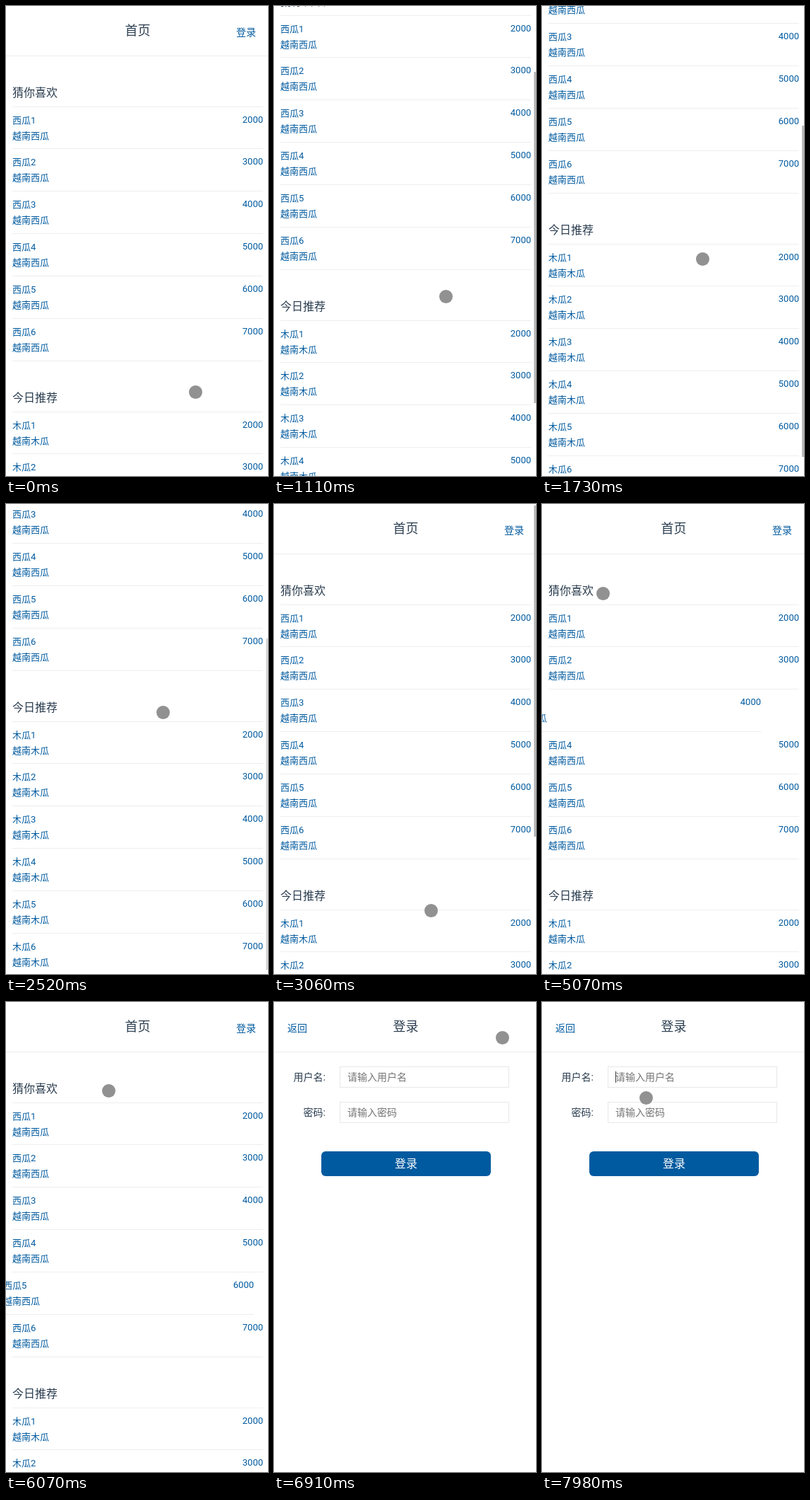
Recreate the animation shown at these times as an HTML page. Size 371x664 px, loop 8 s.

```html
<!DOCTYPE html>
<html lang="zh-CN">
<head>
<meta charset="utf-8">
<style>
html, body { margin: 0; width: 100%; height: 100%; overflow: hidden; background: #fff; }
body { position: relative; font-family: Roboto, "Noto Sans CJK SC", "Noto Sans CJK", sans-serif; }
div { position: absolute; box-sizing: border-box; }
.page { left: 0; top: 0; width: 371px; height: 934px; color: #2c3e50; }
.text { height: 20px; line-height: 20px; white-space: nowrap; }
.title { font-weight: 300; }
.link { color: #005a9f; }
.line { height: 1px; background: #eee; }
.field { left: 93px; width: 240px; height: 30px; border: 1px solid #e8e8e8; }
.hint { color: #757575; }
#button { left: 67px; top: 211px; width: 240px; height: 35px; border-radius: 6px; background: #005a9f; color: #fff; }
#caret { left: 104px; top: 98px; width: 1px; height: 16px; background: #333; }
#bar { left: 368px; top: 2px; width: 3px; height: 468px; background: #bbb; }
#dot { left: -9px; top: -9px; width: 19px; height: 19px; border-radius: 50%; background: #919191; }
</style>
</head>
<body>
<script>
const LOOP = 8000, LOGIN = 6830, MAX_SCROLL = 266, SWIPE = 700;

function box(parent, className, style = {}, id = '') {
  const el = document.createElement('div');
  el.className = className;
  el.id = id;
  for (const k in style) el.style[k] = style[k] + 'px';
  parent.append(el);
  return el;
}

// y is the middle of the text; align picks which end of it x names
function text(parent, str, x, y, size, className = '', align = 'left') {
  const shift = { left: 0, center: -50, right: -100 }[align];
  const el = box(parent, 'text ' + className, { left: x, top: y - 10, fontSize: size });
  if (shift) el.style.transform = `translateX(${shift}%)`;
  el.textContent = str;
}

const line = (parent, y, left = 9, width = 355) => box(parent, 'line', { left, top: y, width });

function header(page, title) {
  text(page, title, 186.5, 35, 18, 'title', 'center');
  line(page, 70, 0, 371);
}

function section(page, top, title, fruit) {
  text(page, title, 9, top + 123, 16);
  line(page, top + 142);
  return [1, 2, 3, 4, 5, 6].map(n => {
    const y = n === 1 ? 162 : 101 + n * 60;
    const row = box(page, '', { left: 0, top, width: 371, height: 0 });
    text(row, fruit + n, 9, y, 13, 'link');
    text(row, '越南' + fruit, 9, y + 22, 13, 'link');
    text(row, (n + 1) * 1000, 364, y - 1, 13, 'link', 'right');
    line(row, 141 + n * 60);
    return row;
  });
}

const home = box(document.body, 'page');
header(home, '首页');
text(home, '登录', 326, 37, 14, 'link');
const rows = section(home, 0, '猜你喜欢', '西瓜');
section(home, 431, '今日推荐', '木瓜');

const login = box(document.body, 'page');
header(login, '登录');
text(login, '返回', 19, 37, 14, 'link');
['用户名', '密码'].forEach((name, i) => {
  const y = 106 + i * 50;
  text(login, name + ':', 73, y, 14, '', 'right');
  box(login, 'field', { top: y - 15 });
  text(login, '请输入' + name, 104, y, 14, 'hint');
});
const button = box(login, '', {}, 'button');
text(button, '登录', 120, 17.5, 16, '', 'center');
const caret = box(login, '', {}, 'caret');

const bar = box(document.body, '', {}, 'bar');
const dot = box(document.body, '', {}, 'dot');

// 0 before a, 1 from b on, linear in between
const ramp = (t, a, b) => t >= b ? 1 : t <= a ? 0 : (t - a) / (b - a);

// flick down to the end of the list, then drag back to the top
const scrollAt = t => MAX_SCROLL * (1 - (1 - ramp(t, 560, 2060)) ** 1.45 - ramp(t, 2580, 3060));

// the bar dims while the list rests
const barAlpha = t =>
  ramp(t, 560, 640) - .45 * (ramp(t, 2200, 2520) - ramp(t, 2580, 2640)) - ramp(t, 3200, 3600);

// pull to the left, spring back slightly too far, settle
function swipe(t, start) {
  const u = ramp(t, start, start + SWIPE);
  return -180 * (1 - u) ** 2 * Math.sin(2 * Math.PI * u * u);
}
const swipes = [[3, 3970], [2, 4820], [4, 5985]];

// pointer moves: from, to, x, y
const moves = [
  [0, 0, 268, 545], [70, 70, 244, 474], [410, 410, 245, 470],
  [560, 1110, 243, 410], [1110, 1730, 227, 357], [1730, 2400, 222, 294],
  [2580, 3060, 222, 574], [3060, 4070, 104, 126], [4820, 5500, 56, 125],
  [5680, 5760, 93, 125], [5910, 6070, 145, 125], [6100, 6680, 340, 41],
  [6830, 7600, 180, 128], [7680, 7980, 147, 135]
];
const pointerAt = t => moves.reduce(([px, py], [a, b, x, y]) => {
  const f = ramp(t, a, b);
  return [px + (x - px) * f, py + (y - py) * f];
}, [0, 0]);

const place = (el, x, y) => {
  el.style.transform = `translate(${Math.round(x)}px, ${Math.round(y)}px)`;
};

function draw(t) {
  const y = scrollAt(t);
  home.style.display = t < LOGIN ? '' : 'none';
  login.style.display = t < LOGIN ? 'none' : '';
  place(home, 0, -y);
  for (const [i, start] of swipes) place(rows[i], swipe(t, start), 0);
  place(bar, 0, y * .705);
  bar.style.opacity = barAlpha(t);
  caret.style.visibility = t >= 7680 ? 'visible' : 'hidden';
  place(dot, ...pointerAt(t));
}

const start = performance.now();
function tick() {
  draw((performance.now() - start) % LOOP);
  requestAnimationFrame(tick);
}
tick();
</script>
</body>
</html>
```
